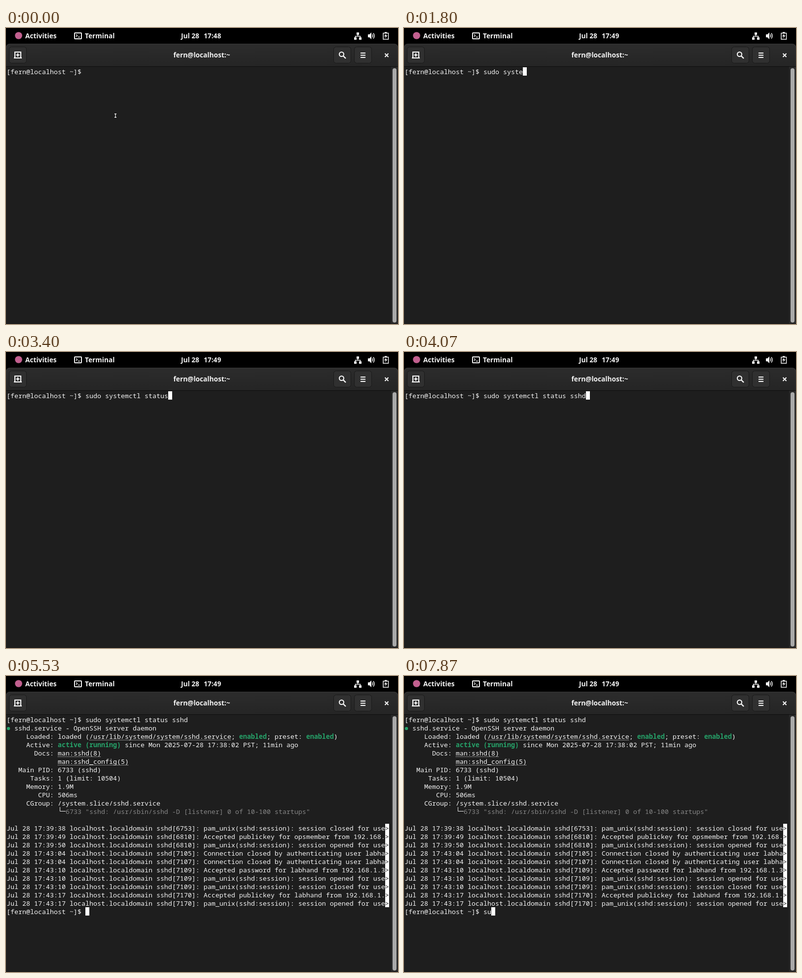
Write an HTML page that moves like this. It is 795x603 px and loops after 8 s.

```html
<!DOCTYPE html>
<html lang="en">
<head>
<meta charset="utf-8">
<title>Terminal</title>
<style>
  html, body { margin: 0; width: 795px; height: 603px; overflow: hidden; background: #1e1e1e; }
  svg { position: absolute; left: 0; top: 0; }
  svg text { font: 600 13.7px "Noto Sans", "Open Sans", sans-serif; fill: #f2f2f2; white-space: pre; }
  pre {
    position: absolute; left: 1px; top: 81px; margin: 0; color: #f4f4f4;
    font: 13.3333px/17px "Noto Sans Mono", "DejaVu Sans Mono", monospace;
    font-variant-ligatures: none;
  }
  pre b { color: #26a269; }
  pre i { font-style: normal; color: #858585; }
  pre u {
    display: inline-block; text-decoration: none;
    background: linear-gradient(90deg, #f4f4f4 50%, transparent 0) 0 15px / 2px 1px repeat-x;
  }
  /* The cell starts 1px above its line of text */
  .rev {
    display: inline-block; height: 16px; margin-top: -1px; padding-top: 1px;
    vertical-align: top; background: #fff; color: #1e1e1e;
  }
</style>
</head>
<body>
<pre id="screen"></pre>
<svg width="795" height="603" fill="none" stroke-width="2">
  <defs>
    <linearGradient id="bar" x2="0" y2="1">
      <stop stop-color="#2c2c2c"/><stop offset="1" stop-color="#252525"/>
    </linearGradient>
    <rect id="button" x=".5" y=".5" width="35" height="33" rx="5" fill="#303030" stroke="#191919" stroke-width="1"/>
  </defs>

  <!-- top bar -->
  <path fill="#000" d="M0 0H795V42H0z"/>
  <circle cx="25.5" cy="15.5" r="7.3" fill="#c2608f"/>
  <text x="39" y="21">Activities</text>
  <g stroke="#f2f2f2">
    <rect x="139" y="10" width="14" height="12" rx="1"/>
    <path d="M142 13l2.5 2.5L142 18M146 18.5h4" stroke-width="1.4"/>
  </g>
  <text x="160" y="21">Terminal</text>
  <text x="355" y="21">Jul 28</text>
  <text x="401" y="21" id="clock"></text>
  <g fill="#f2f2f2">
    <path d="M711 9h5v5h-5zM706 19h5v5h-5zM716 19h5v5h-5z"/>
    <path d="M734 13h3l4-4v14l-4-4h-3z"/>
    <path d="M771.5 11l-4.5 6h3l-1 4 4.5-6h-3z"/>
  </g>
  <g stroke="#f2f2f2" stroke-width="1.5">
    <path d="M713.5 14v3M708.5 20v-3.2h10V20"/>
    <path d="M743 13q2 3 0 6M745 10.5q4 5.5 0 11"/>
    <path d="M765 10.5h10.5v12.5H765zM768 9h4.5"/>
  </g>

  <!-- window header -->
  <path d="M0 78V40q0-8 8-8H787q8 0 8 8V78z" fill="url(#bar)"/>
  <path d="M1 39.5q1-7 8-7H786q7 0 8 7" stroke="#383838" stroke-width="1"/>
  <path d="M0 78.5H795" stroke="#0e0e0e" stroke-width="1"/>
  <use href="#button" x="6" y="38"/>
  <use href="#button" x="664" y="38"/>
  <use href="#button" x="706" y="38"/>
  <g stroke="#fff">
    <path d="M18 61V49H30V61M16 61H32M24 51.5v7M20.5 55h7"/>
    <circle cx="680.5" cy="53.5" r="4.5"/>
    <path d="M684 57l5 5" stroke-width="2.4"/>
    <path d="M719 51h10M719 55.5h10M719 60h10"/>
    <path d="M768.5 52l7 7M775.5 52l-7 7"/>
  </g>
  <text x="397" y="60" text-anchor="middle" id="title"></text>

  <!-- scrollbar and window edge -->
  <path fill="#2a2a2a" d="M781 79h14v524h-14z"/>
  <path d="M0 602.5H795" stroke="#171717" stroke-width="1"/>
  <rect x="784" y="82" width="8" height="518" rx="4" fill="#a9a9a9"/>

  <g id="marks">
    <circle cx="5" cy="107" r="3.2" fill="#26a269"/>
    <path d="M109.5 267V275.5H121" stroke="#f4f4f4" stroke-width="1"/>
  </g>
  <g id="pointer" stroke-linecap="square">
    <path d="M221 175h2M222 175v7M221 182h2" stroke="#000" stroke-width="3"/>
    <path d="M220.5 175h3M222 175v7M220.5 182h3" stroke="#fff" stroke-width="1.3"/>
  </g>
</svg>
<script>
const LOOP = 8000, OUTPUT = 4200, TITLED = 4330, QUIT = 5530;
const byId = id => document.getElementById(id);
const rev = s => `<span class="rev">${s}</span>`;

const host = 'fern@localhost';
const prompt = `[${host} ~]$ `;
const command = 'sudo systemctl status sshd';

// When each character of the command appears
const keys = [730, 930, 1000, 1130, 1270, 1400, 1470, 1600, 1670, 1800, 1930, 2070, 2200,
  2200, 2330, 2530, 2730, 2870, 3000, 3130, 3400, 3530, 3730, 3870, 3930, 4070];
const laterKeys = [7800, 7870];
const cursorOff = [[0, 200], [4730, 5330], [6130, 6730], [7330, 7730]];

const opened = 'pam_unix(sshd:session): session opened for user';
const closed = opened.replace('opened', 'closed');
const refused = 'Connection closed by authenticating user labhand';
const log = [
  ['39:38', 6753, closed],
  ['39:49', 6810, 'Accepted publickey for opsmember from 192.168.1'],
  ['39:50', 6810, opened],
  ['43:04', 7105, refused],
  ['43:04', 7107, refused],
  ['43:10', 7109, 'Accepted password for labhand from 192.168.1.3'],
  ['43:10', 7109, opened],
  ['43:10', 7109, closed],
  ['43:17', 7170, 'Accepted publickey for labhand from 192.168.1.3'],
  ['43:17', 7170, opened],
].map(([time, pid, message]) =>
  `Jul 28 17:${time} localhost.localdomain sshd[${pid}]: ${message.slice(0, 46)}${rev('&gt;')}`);

const field = (name, value) => `${name.padStart(11)}: ${value}`;
const status = [
  prompt + command,
  '  sshd.service - OpenSSH server daemon',
  field('Loaded', 'loaded (<u>/usr/lib/systemd/system/sshd.service</u>; <b>enabled</b>; preset: <b>enabled</b>)'),
  field('Active', '<b>active (running)</b> since Mon 2025-07-28 17:38:02 PST; 11min ago'),
  field('Docs', '<u>man:sshd(8)</u>'),
  ' '.repeat(13) + '<u>man:sshd_config(5)</u>',
  field('Main PID', '6733 (sshd)'),
  field('Tasks', '1 (limit: 10504)'),
  field('Memory', '1.9M'),
  field('CPU', '506ms'),
  field('CGroup', '/system.slice/sshd.service'),
  ' '.repeat(15) + '<i>6733 "sshd: /usr/sbin/sshd -D [listener] 0 of 10-100 startups"</i>',
  '',
  ...log,
  '',
].join('\n');

const typed = (times, t) => command.slice(0, times.filter(k => k <= t).length);

function screenAt(t) {
  const cursor = cursorOff.some(([a, b]) => t >= a && t < b) ? ' ' : rev(' ');
  if (t < OUTPUT) return prompt + typed(keys, t) + cursor;
  if (t < QUIT) return status + rev('lines 1-22/22 (END)') + cursor;
  return status + prompt + typed(laterKeys, t) + cursor;
}

let shown;
function draw() {
  const t = performance.now() % LOOP;
  const html = screenAt(t);
  if (html !== shown) byId('screen').innerHTML = shown = html;
  byId('clock').textContent = t < 1000 ? '17:48' : '17:49';
  byId('title').textContent = `${host}:~` + (t >= TITLED && t < QUIT ? ` — ${command}` : '');
  byId('marks').style.display = t < OUTPUT ? 'none' : '';
  byId('pointer').style.display = t < 670 ? '' : 'none';
  requestAnimationFrame(draw);
}
draw();
</script>
</body>
</html>
```
